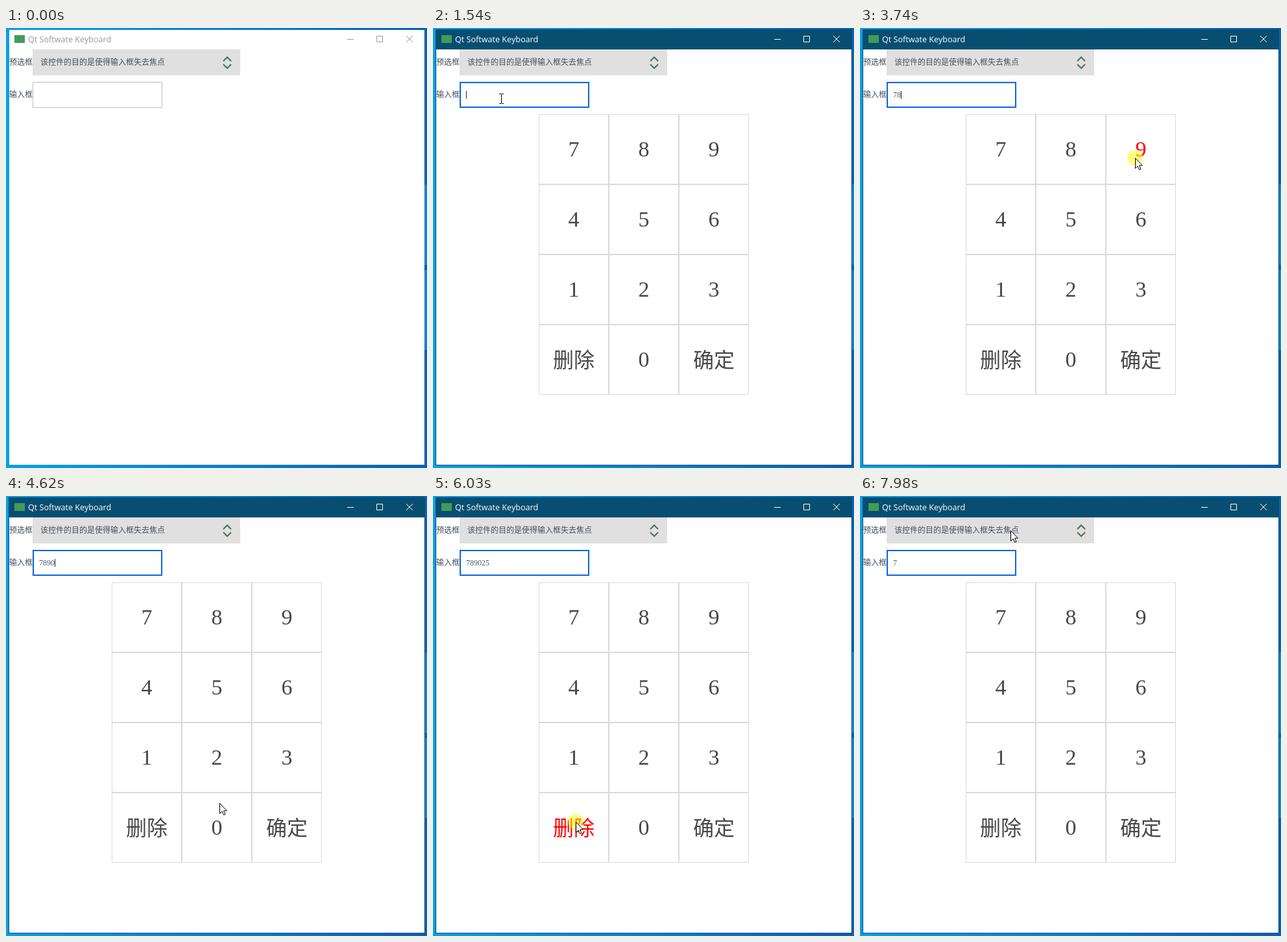
Recreate the animation shown at these times as an HTML page. Size 649 px wide and 678 px high, loop 8000 ms.

```html
<!DOCTYPE html>
<html lang="zh">
<head>
<meta charset="utf-8">
<title>Qt Softwate Keyboard</title>
<style>
  html, body { margin: 0; width: 100%; height: 100%; overflow: hidden; }
  svg { display: block; }
  text { white-space: pre; }
  .title { font: 12.6px "Open Sans", sans-serif; fill: #999; }
  .label { font: 12px "Noto Sans CJK SC", "Noto Sans CJK", sans-serif; fill: #46505c; }
  .entry { font: 12px "Liberation Serif", serif; fill: #46566a; }
  .key rect { fill: #fff; stroke: #dadada; }
  .key text { font: 34px "Liberation Serif", serif; fill: #484848; text-anchor: middle; }
  .key .word { font: 300 32px "Noto Sans CJK SC", "Noto Sans CJK", sans-serif; }
  .key.down text { fill: #f00; }
  .buttons { fill: none; stroke: #999; }
  .bar, #pad { visibility: hidden; }
  .active .bar, .active #pad { visibility: visible; }
  .active .title { fill: #fff; }
  .active .buttons { stroke: #fff; }
  .box { fill: #fff; stroke: #bdbdbd; }
  .active .box { stroke: #0a64e6; stroke-width: 2; }
</style>
</head>
<body>
<svg id="stage" width="649" height="678" viewBox="0 0 649 678">
  <defs>
    <linearGradient id="sky">
      <stop offset="0" stop-color="#079fe8"/>
      <stop offset=".5" stop-color="#0780d2"/>
      <stop offset="1" stop-color="#0660b4"/>
    </linearGradient>
  </defs>
  <rect width="649" height="678" fill="url(#sky)"/>
  <path d="M645 241h4v124h-4zM645 373h4v123h-4z" fill="#1683d8"/>
  <rect class="bar" x="4" y="2" width="642" height="672" fill="#074e70"/>
  <rect x="5" y="3" width="640" height="670" fill="#fff"/>
  <rect class="bar" x="4" y="2" width="642" height="31" fill="#074e70"/>
  <rect x="13" y="11" width="16" height="12" fill="#419b5b"/>
  <text class="title" x="34" y="22">Qt Softwate Keyboard</text>
  <path class="buttons" d="M526 17.5h10M571.5 12.5h9v9h-9zM617 12l10 10M627 12l-10 10"/>
  <text class="label" x="5" y="57">预选框</text>
  <rect x="41" y="33" width="320" height="40" fill="#e0e0e0"/>
  <text class="label" x="53" y="57">该控件的目的是使得输入框失去焦点</text>
  <path d="M335 51l6-6 6 6M335 56l6 6 6-6" fill="none" stroke="#4a7457" stroke-width="2.2"/>
  <text class="label" x="5" y="107">输入框</text>
  <rect class="box" id="box"/>
  <text class="entry" id="entry" x="51" y="107"></text>
  <rect id="caret" y="97" width="1" height="12" fill="#222"/>
  <g id="pad"></g>
  <g id="mouse">
    <circle id="halo" r="12" fill="#ff0" fill-opacity=".5"/>
    <path id="arrow" d="M.5 .5V16.3L4.1 12.9 6.6 18.5 9 17.5 6.6 12H11.4Z" fill="#fff" stroke="#000"/>
    <path id="beam" d="M-3 -7.5H0M1 -7.5H4M.5 -7V7M-3 7.5H0M1 7.5H4" fill="none" stroke="#000"/>
  </g>
</svg>
<script>
const LOOP = 8000, TICK = 80, BLINK = 530, FOCUS = 1470;
const DEL = '删除', OK = '确定';
const $ = id => document.getElementById(id);
const show = (el, on) => { el.style.display = on ? '' : 'none'; };

// Pointer stops: time, x, y. A stop without a place holds the last one.
const path = [
  [610, 401, 517], [780, 203, 149], [850], [1390, 105, 109], [2010],
  [2410, 217, 195], [2490], [2640, 303, 201], [2890, 323, 370],
  [2970, 320, 377], [3260, 324, 200], [3420], [3660, 424, 200], [3820],
  [4060, 354, 464], [4130], [4210, 351, 470], [4300], [4460, 330, 507],
  [4540], [4780, 326, 405], [4860], [5100, 329, 285], [5180],
  [5330, 319, 221], [5410], [5950, 220, 502], [7290],
  [7810, 245, 41], [7895], [7975, 232, 53]
];
path.forEach((p, i) => { if (p.length < 2) p.push(...path[i - 1].slice(1)); });

// Clicks: key, press time, release time
const clicks = [
  ['', FOCUS, 1540], ['7', 2410, 2490], ['8', 3260, 3340], ['9', 3740, 3820],
  ['0', 4460, 4540], ['2', 4780, 4860], ['5', 5100, 5250],
  [DEL, 6030, 6120], [DEL, 6270, 6360], [DEL, 6440, 6590],
  [DEL, 6990, 7070], [DEL, 7210, 7290]
];

const keys = {};
['7', '8', '9', '4', '5', '6', '1', '2', '3', DEL, '0', OK].forEach((name, i) => {
  const x = 163 + i % 3 * 108, y = 133 + Math.floor(i / 3) * 108;
  const word = name.length > 1;
  const g = document.createElementNS('http://www.w3.org/2000/svg', 'g');
  g.setAttribute('class', 'key');
  g.innerHTML = `<rect x="${x + .5}" y="${y + .5}" width="107" height="107"/>
    <text class="${word ? 'word' : ''}" x="${x + 54}" y="${y + (word ? 66 : 65)}">${name}</text>`;
  $('pad').append(g);
  keys[name] = g;
});

// The pointer is sampled in discrete ticks between stops
function pointer(t) {
  const i = path.findIndex(p => p[0] > t);
  if (i < 0) return path[path.length - 1].slice(1);
  const [t0, x0, y0] = path[i - 1], [t1, x1, y1] = path[i];
  const n = Math.max(1, Math.round((t1 - t0) / TICK));
  const k = Math.floor((t - t0) / (t1 - t0) * n) / n;
  return [x0 + (x1 - x0) * k, y0 + (y1 - y0) * k].map(Math.round);
}

function setBox(active) {
  const d = active ? 1 : .5;
  const attrs = { x: 41 + d, y: 83 + d, width: 200 - 2 * d, height: 40 - 2 * d };
  for (const a in attrs) $('box').setAttribute(a, attrs[a]);
}

function draw(t) {
  const active = t >= FOCUS;
  $('stage').classList.toggle('active', active);
  setBox(active);

  let value = '', edited = FOCUS, held = null;
  for (const [key, down, up] of clicks) {
    if (t >= down && t < up) held = key;
    if (t < up || !key) continue;
    value = key === DEL ? value.slice(0, -1) : value + key;
    edited = up;
  }
  $('entry').textContent = value;
  $('caret').setAttribute('x', 51 + value.length * 6);
  show($('caret'), active && (t - edited) % (2 * BLINK) < BLINK);
  for (const name in keys) keys[name].classList.toggle('down', name === held);

  const seen = t >= path[0][0];
  show($('mouse'), seen);
  if (!seen) return;
  const [x, y] = pointer(t);
  const overBox = x >= 41 && x < 241 && y >= 83 && y < 123;
  $('mouse').setAttribute('transform', `translate(${x} ${y})`);
  show($('halo'), held !== null);
  show($('beam'), overBox);
  show($('arrow'), !overBox);
}

function loop() {
  draw(performance.now() % LOOP);
  requestAnimationFrame(loop);
}
loop();
</script>
</body>
</html>
```
